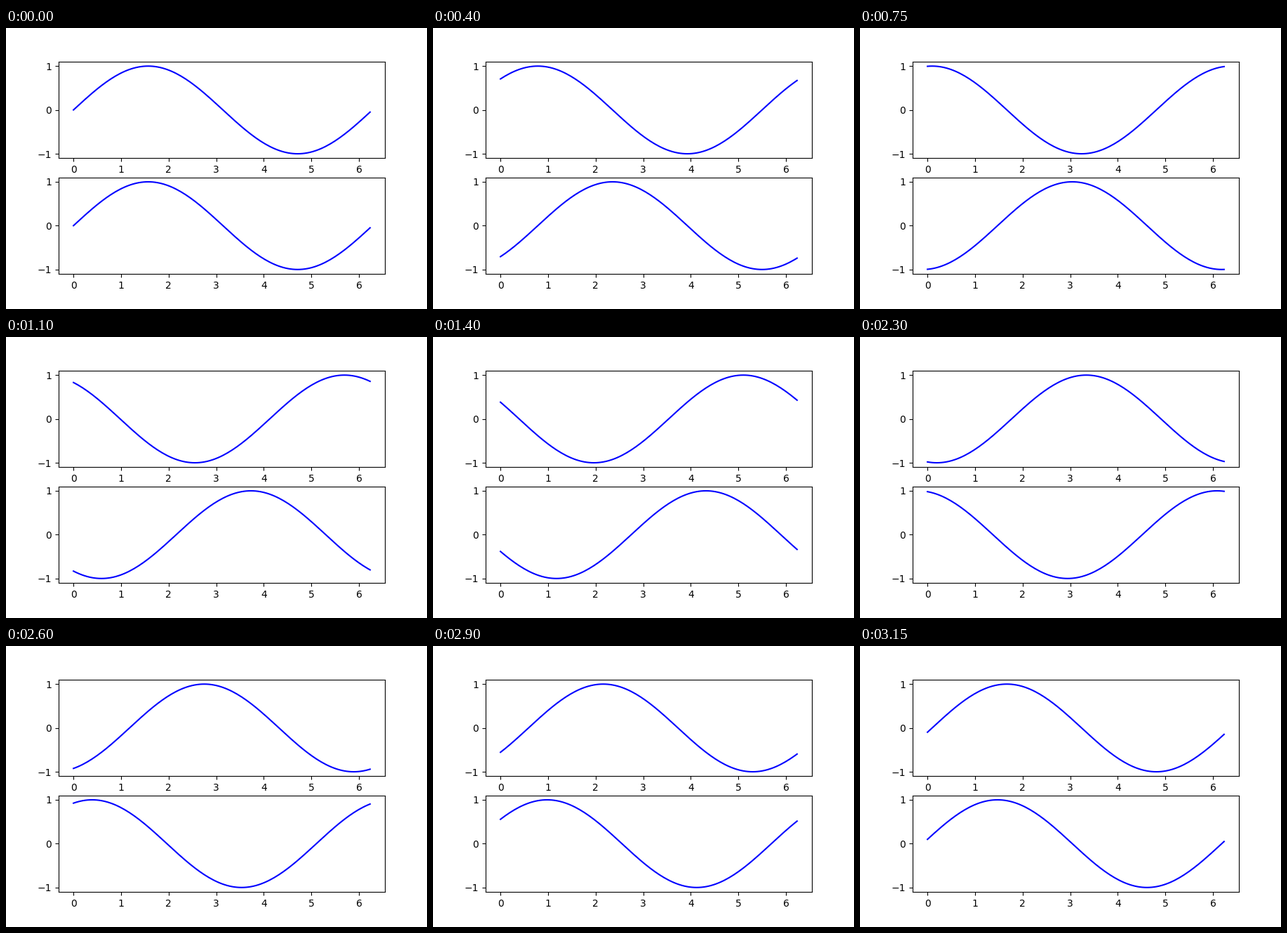
Animation, 600 px wide and 400 px high, one loop 3.2 s. Source, as a matplotlib script:

```python
import matplotlib.pyplot as plt
import numpy as np
from matplotlib.animation import FuncAnimation

FRAMES = 64
INTERVAL = 50  # ms
TAU = 2 * np.pi

plt.rcParams["font.family"] = "DejaVu Sans"

x = np.linspace(0, TAU, 128, endpoint=False)

fig, axes = plt.subplots(2, 1, figsize=(6, 4), dpi=100)
fig.subplots_adjust(left=0.125, right=0.9, bottom=0.125, top=0.88, hspace=0.2)


def make_wave(ax):
    line, = ax.plot(x, np.sin(x), color="blue", linewidth=1.5)
    ax.set_xticks(range(7))
    ax.set_yticks([-1, 0, 1])
    margin = 0.05 * x[-1]
    ax.set_xlim(-margin, x[-1] + margin)
    ax.set_ylim(-1.1, 1.1)
    return line


lines = [make_wave(ax) for ax in axes]


def update(i):
    phase = TAU * i / FRAMES
    # The upper wave travels left, the lower one right.
    for line, direction in zip(lines, (1, -1)):
        line.set_ydata(np.sin(x + direction * phase))
    return lines


anim = FuncAnimation(fig, update, frames=FRAMES, interval=INTERVAL,
                     repeat=True, repeat_delay=0)

plt.show()
```
